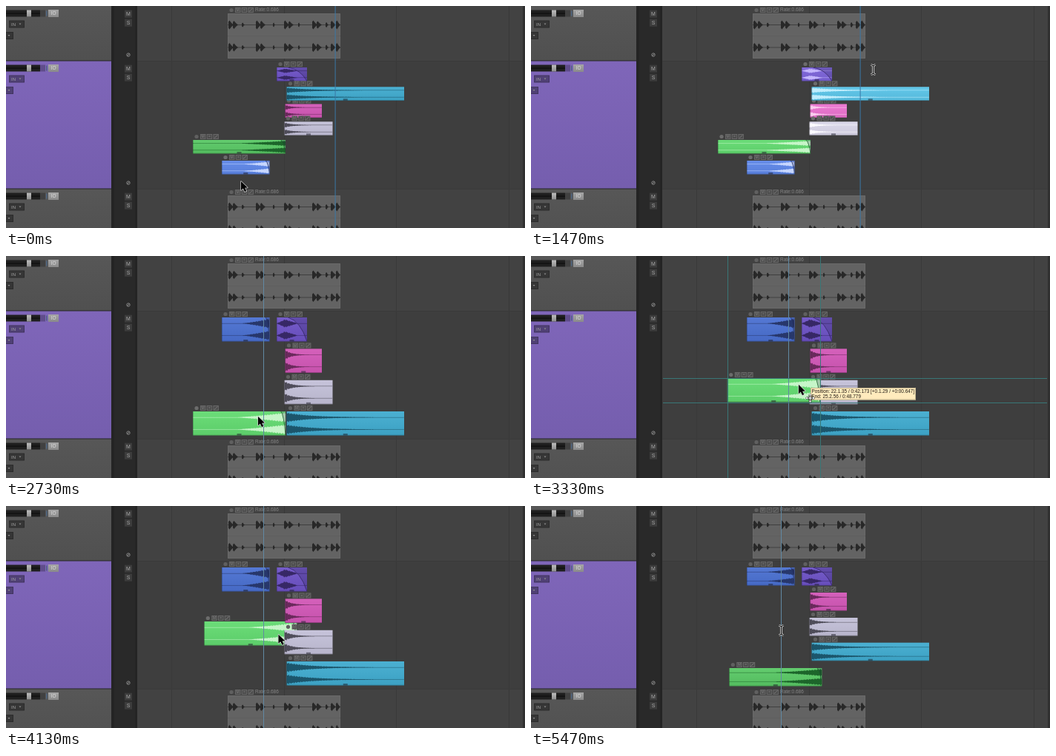
An HTML page with a canvas for the animation above (5.53 s loop, 700 by 300 pixels).

```html
<!DOCTYPE html>
<html lang="en">
<head>
<meta charset="utf-8">
<title>Arrange view</title>
<style>
html, body { margin: 0; width: 100%; height: 100%; overflow: hidden; background: #3e3e3e; }
canvas { display: block; width: 100vw; height: 100vh; }
</style>
</head>
<body>
<canvas id="stage" width="700" height="300"></canvas>
<script>
const ctx = document.getElementById('stage').getContext('2d');
const LOOP = 5530, RATE = 0.015;
const SANS = '"Liberation Sans", Arial, sans-serif';

// Steps (1/15 s) at which the picture changes hard
const SELECT_ALL = 9, BEAM_ON = 11, REPACK = 23, BEAM_OFF = 25, PICK_ONE = 38,
      DRAG = 43, DROP = 53, SELECT_MORE = 65, COLLAPSE = 74, BEAM_AGAIN = 79, CLEAR = 80;

const decay = k => u => Math.exp(-k * u);
const rise = (from, pow) => u => Math.pow(Math.max(0, (u - from) / (1 - from)), pow);
const bump = u => 0.85 * (u < 0.28 ? u / 0.28 : Math.max(0, 1 - (u - 0.28) / 0.42));

// lanes: row in the six, four and five lane layouts
const clips = [
  { id: 'green', x: 252, w: 125, fill: '#59c865', lit: '#62da70', dark: '#1d652b', pale: '#c6f5c8', env: rise(0.45, 1.3), lanes: [4, 3, 4], fade: 0.95 },
  { id: 'blue', x: 291, w: 64.5, fill: '#4a70d1', lit: '#5d86e8', dark: '#28386c', pale: '#c6d6ff', env: rise(0.38, 1.4), lanes: [5, 0, 0], fade: 0.92 },
  { id: 'purple', x: 365, w: 41, fill: '#6d52c6', lit: '#7b62d8', dark: '#372866', pale: '#c3b5fb', env: bump, lanes: [0, 0, 0], fade: 0.38 },
  { id: 'pink', x: 376.5, w: 49.5, fill: '#d257b7', lit: '#eb72cf', dark: '#6a2a5c', pale: '#fbcdef', env: decay(5.5), lanes: [2, 1, 1] },
  { id: 'white', x: 375.5, w: 65, fill: '#c3c0d8', lit: '#dad7ea', dark: '#4f4d5a', pale: '#fbfaff', env: decay(5.5), lanes: [3, 2, 2] },
  { id: 'cyan', x: 378.5, w: 158.5, fill: '#40abcf', lit: '#5ac4e8', dark: '#1c566c', pale: '#bfedfc', env: decay(4.5), lanes: [1, 3, 3] }
];
const layouts = [
  { tops: [83, 109.3, 132.5, 156.3, 181, 209], h: 18.5 },
  { tops: [83, 125.4, 167.8, 210], h: 32.5 },
  { tops: [83, 117, 151, 184.7, 219], h: 24.5 }
];

// step, x, y of the pointer tip
const path = [
  [0, 317, 237], [1, 317, 237], [8, 453, 72], [10, 461.5, 78], [23, 461.5, 78],
  [25, 433, 91], [29, 395, 108], [33, 347, 129], [38, 347, 214], [41, 340, 217],
  [43, 348, 217], [50, 361, 174], [52, 363, 165], [54, 360.5, 182], [57, 360.5, 190],
  [61, 350, 205], [65, 420, 80], [69, 400.5, 135], [71, 400.5, 135], [79, 337.5, 160], [83, 337.5, 160]
];
const shift = [[43, 0, 0], [50, 12.75, -45], [52, 15.3, -54], [83, 15.3, -54]];

function along(keys, s) {
  if (s <= keys[0][0]) return keys[0].slice(1);
  const i = keys.findIndex(k => k[0] >= s);
  const a = keys[i - 1], b = keys[i];
  const p = (s - a[0]) / (b[0] - a[0]);
  return [a[1] + (b[1] - a[1]) * p, a[2] + (b[2] - a[2]) * p];
}

function rect(x, y, w, h, fill) {
  ctx.fillStyle = fill;
  ctx.fillRect(x, y, w, h);
}

function shade(x, y, w, h, top, bottom) {
  const g = ctx.createLinearGradient(0, y, 0, y + h);
  g.addColorStop(0, top);
  g.addColorStop(1, bottom);
  rect(x, y, w, h, g);
}

function frame(x, y, w, h, color) {
  ctx.strokeStyle = color;
  ctx.lineWidth = 1;
  ctx.strokeRect(x + 0.5, y + 0.5, w - 1, h - 1);
}

function text(str, x, y, size, color, align = 'left') {
  ctx.font = `${size}px ${SANS}`;
  ctx.textAlign = align;
  ctx.textBaseline = 'middle';
  ctx.fillStyle = color;
  ctx.fillText(str, x, y);
}

function poly(points, fill, stroke, width = 1) {
  ctx.beginPath();
  points.forEach(([x, y]) => ctx.lineTo(x, y));
  ctx.closePath();
  if (stroke) {
    ctx.strokeStyle = stroke;
    ctx.lineWidth = width;
    ctx.lineJoin = 'round';
    ctx.stroke();
  }
  ctx.fillStyle = fill;
  ctx.fill();
}

function line(x1, y1, x2, y2, color, width = 1) {
  ctx.strokeStyle = color;
  ctx.lineWidth = width;
  ctx.beginPath();
  ctx.moveTo(x1, y1);
  ctx.lineTo(x2, y2);
  ctx.stroke();
}

function dropdown(x, y, w, label) {
  rect(x, y - 5, w, 10, 'rgba(0,0,0,0.36)');
  frame(x, y - 5, w, 10, 'rgba(0,0,0,0.18)');
  if (label) text(label, x + 3, y + 0.5, 6, '#a4a4a4');
  const t = x + w - 6;
  poly([[t - 1.5, y - 1], [t + 1.5, y - 1], [t, y + 1]], '#8c8c8c');
}

function smallButton(x, y, label) {
  rect(x - 5, y - 5, 10, 10, '#3c3c3c');
  text(label, x, y + 0.5, 7, '#a9a9a9', 'center');
}

function track(y, h, mid, top, bottom) {
  shade(0, y, 142, h, top, bottom);
  rect(0, mid - 4.5, 46, 9, '#1f1f1f');
  rect(0, mid - 0.5, 46, 1, '#0a0a0a');
  shade(28, mid - 4.5, 6, 9, '#bdbdbd', '#8e8e8e');
  rect(46, mid - 4.5, 7, 9, 'rgba(0,0,0,0.25)');
  rect(54, mid - 3.5, 1.5, 7, '#4d6480');
  shade(57, mid - 5, 14, 10, '#a6a6a6', '#8a8a8a');
  text('IO', 64, mid + 0.5, 6.5, '#dddddd', 'center');
  dropdown(4, mid + 14.5, 21, 'IN');
  dropdown(-4, mid + 30, 14);
  smallButton(165, mid + 0.7, 'M');
  smallButton(165, mid + 12.7, 'S');
  const end = y + h - 7.5;
  ctx.strokeStyle = '#888888';
  ctx.lineWidth = 1;
  ctx.beginPath();
  ctx.arc(165, end, 2.2, 0, 7);
  ctx.stroke();
  line(163.2, end + 2, 166.8, end - 2, '#888888');
}

function icons(x, top, lit) {
  const y = top - 4.5;
  ctx.fillStyle = lit ? '#6c6c6c' : '#606060';
  ctx.beginPath();
  ctx.arc(x + 5, y, 2.6, 0, 7);
  ctx.fill();
  for (let i = 0; i < 3; i++) {
    const l = x + 10 + i * 8.7;
    rect(l, y - 3.5, 7.5, 7, '#686868');
    rect(l + 1, y - 2.5, 5.5, 5, '#4c4c4c');
    if (i === 2) line(l + 1.5, y + 2, l + 6, y - 2, '#858585', 0.8);
    else text(i ? '=' : 'M', l + 3.7, y + 0.3, 5, '#858585', 'center');
  }
}

const grain = i => 0.78 + 0.22 * Math.sin(i * 12.9898) * Math.cos(i * 4.137);

// Two stereo channels, one above the other
function wave(c, x, y, h, color) {
  const half = h / 4;
  for (const mid of [y + half, y + 3 * half]) {
    const up = [], down = [];
    for (let i = 0; i <= c.w; i++) {
      const a = Math.max(0.15, c.env(i / c.w) * (half - 0.5) * grain(i));
      up.push([x + i, mid - a]);
      down.unshift([x + i, mid + a]);
    }
    poly(up.concat(down), color);
    ctx.globalAlpha = 0.4;
    line(x, mid, x + c.w, mid, color, 0.8);
    ctx.globalAlpha = 1;
  }
}

function drawClip(c, x, y, h, lit) {
  const ink = lit ? c.pale : c.dark;
  icons(x, y, lit);
  rect(x, y, c.w, h, lit ? c.lit : c.fill);
  shade(x, y, c.w, h, 'rgba(255,255,255,0.06)', 'rgba(0,0,0,0.06)');
  ctx.save();
  ctx.beginPath();
  ctx.rect(x, y, c.w, h);
  ctx.clip();
  wave(c, x, y, h, ink);
  if (c.fade) {
    ctx.beginPath();
    ctx.moveTo(x + c.w * c.fade, y);
    ctx.quadraticCurveTo(x + c.w * (c.fade * 0.35 + 0.65), y + h * 0.15, x + c.w, y + h);
    ctx.strokeStyle = c.dark;
    ctx.lineWidth = 0.8;
    ctx.stroke();
    ctx.lineTo(x + c.w, y);
    ctx.fillStyle = 'rgba(20,15,50,0.2)';
    ctx.fill();
  }
  ctx.restore();
  rect(x, y + h - 0.8, c.w, 0.8, 'rgba(0,0,0,0.25)');
  rect(x, y, 0.7, h, 'rgba(0,0,0,0.3)');
  const m = x + c.w / 2;
  rect(m - 3, y + h - 2.5, 6, 2.5, 'rgba(30,30,40,0.5)');
}

// Hits of the drum loop: x, length, height
const hits = [
  [300, 7, 6], [306, 7, 5.5], [318, 4, 3], [337, 7, 6], [343, 7, 5.5], [360, 3, 3],
  [375, 7, 6], [381, 7, 5], [394, 3, 3], [413, 7, 6], [419, 7, 5], [431, 4, 3.5], [438, 7, 5.5], [445, 6, 6]
];

function drumClip(y, lit) {
  const ink = lit ? '#ffffff' : '#282828';
  icons(299, y, lit);
  text('Rate:0.686', 336, y - 4.5, 6.5, lit ? '#c4c4c4' : '#858585');
  rect(299, y, 152, 61, lit ? '#7c7c7c' : '#636363');
  frame(299, y, 152, 61, lit ? '#868686' : '#6a6a6a');
  rect(299, y + 30, 152, 1, lit ? '#757575' : '#5e5e5e');
  for (const mid of [y + 15.5, y + 46]) {
    line(299, mid, 451, mid, ink, 0.6);
    for (const [x, w, a] of hits) {
      poly([[x, mid - a * 0.7], [x + 1.5, mid - a], [x + w * 0.6, mid - a * 0.4], [x + w, mid],
            [x + w * 0.6, mid + a * 0.4], [x + 1.5, mid + a], [x, mid + a * 0.7]], ink);
    }
  }
}

function arrow(x, y) {
  poly([[x, y], [x, y + 12], [x + 2.8, y + 9.5], [x + 5, y + 14], [x + 7.2, y + 13],
        [x + 5.1, y + 8.7], [x + 8.8, y + 8.6]], '#000000', '#d2d2d2', 1.4);
}

function beam(x, y) {
  for (const [color, width] of [['#e6e6e6', 2.8], ['#000000', 1.1]]) {
    line(x, y + 2, x, y + 14, color, width);
    for (const [a, b] of [[1.5, 2.5], [14.5, 13.5]]) {
      line(x - 3, y + a, x, y + b, color, width);
      line(x + 3, y + a, x, y + b, color, width);
    }
  }
}

function moveMark(x, y) {
  for (const [color, width] of [['#000000', 3], ['#ffffff', 1.3]]) {
    line(x - 5, y, x + 5, y, color, width);
    line(x, y - 5, x, y + 5, color, width);
  }
  for (let i = 0; i < 4; i++) {
    ctx.save();
    ctx.translate(x, y);
    ctx.rotate(i * Math.PI / 2);
    poly([[6, 0], [3.5, -2], [3.5, 2]], '#ffffff', '#000000', 0.8);
    ctx.restore();
  }
}

const clock = s => Math.floor(s / 60) + ':' + (s % 60).toFixed(3).padStart(6, '0');
function bars(s, base) {
  const beats = s * 2, bar = Math.floor(beats / 4);
  return `${bar + base}.${(beats - bar * 4 + base).toFixed(2)}`;
}

function dragInfo(x, y, w, h, dx, px, py) {
  const teal = '#397777';
  for (const gx of [x, x + w]) rect(Math.round(gx), 0, 1, 300, teal);
  for (const gy of [y, y + h]) rect(178, Math.round(gy), 518, 1, teal);
  const delta = dx * 0.647 / 12.75, start = 41.526 + delta;
  const left = px + 16, top = py + 4;
  rect(left, top, 142, 16.5, '#ffebbd');
  frame(left, top, 142, 16.5, '#c4b58f');
  text(`Position: ${bars(start, 1)} / ${clock(start)} [+${bars(delta, 0)} / +${clock(delta).replace(':', ':')}]`,
       left + 1.5, top + 5, 6.4, '#211d16');
  text(`End: ${bars(start + 6.606, 1)} / ${clock(start + 6.606)}`, left + 1.5, top + 12.3, 6.4, '#211d16');
  moveMark(px + 15.5, py + 18);
}

function backdrop() {
  rect(0, 0, 700, 300, '#3e3e3e');
  rect(177, 0, 520, 74, '#424242');
  rect(177, 248, 520, 52, '#424242');
  for (const x of [223, 375, 526, 678]) rect(x, 0, 1, 300, '#393939');
  for (const y of [74, 247]) rect(177, y, 520, 1, '#3a3a3a');
  rect(697, 0, 3, 300, '#303030');
  rect(0, 0, 177, 300, '#242424');
  rect(146, 0, 28, 300, '#292929');
  track(0, 73.5, 10, '#575757', '#505050');
  track(74.5, 172, 84, '#7f66b9', '#755eae');
  track(247.5, 73.5, 257, '#575757', '#505050');
}

function draw(s) {
  const layoutNo = s < REPACK ? 0 : s < COLLAPSE ? 1 : 2;
  const lay = layouts[layoutNo];
  const all = s >= SELECT_ALL && s < PICK_ONE || s >= SELECT_MORE && s < CLEAR;
  const single = s < SELECT_ALL ? 'blue' : s >= PICK_ONE && s < CLEAR ? 'green' : '';
  const dragging = s >= DRAG && s < DROP;
  const [dx, dy] = along(shift, s);
  const [px, py] = along(path, s);

  backdrop();
  drumClip(10, s >= SELECT_MORE && s < CLEAR);
  drumClip(256, false);

  const place = c => {
    const moved = c.id === 'green';
    return [c.x + (moved ? dx : 0), lay.tops[c.lanes[layoutNo]] + (moved && layoutNo === 1 ? dy : 0)];
  };
  const order = dragging ? [...clips.slice(1), clips[0]] : clips;
  for (const c of order) {
    const [x, y] = place(c);
    drawClip(c, x, y, lay.h, all || c.id === single);
  }

  rect(s < PICK_ONE ? 443.6 : s < CLEAR ? 347 : 337, 0, 1, 300, s < PICK_ONE ? '#3a78a6' : '#6189a3');
  if (dragging) {
    const [x, y] = place(clips[0]);
    dragInfo(x, y, clips[0].w, lay.h, dx, px, py);
  }
  const isBeam = s >= BEAM_ON && s < BEAM_OFF || s >= BEAM_AGAIN;
  (isBeam ? beam : arrow)(px, py);
}

function tick(now) {
  draw(Math.floor((now % LOOP + 4) * RATE));
  requestAnimationFrame(tick);
}
draw(0);
requestAnimationFrame(tick);
</script>
</body>
</html>
```
